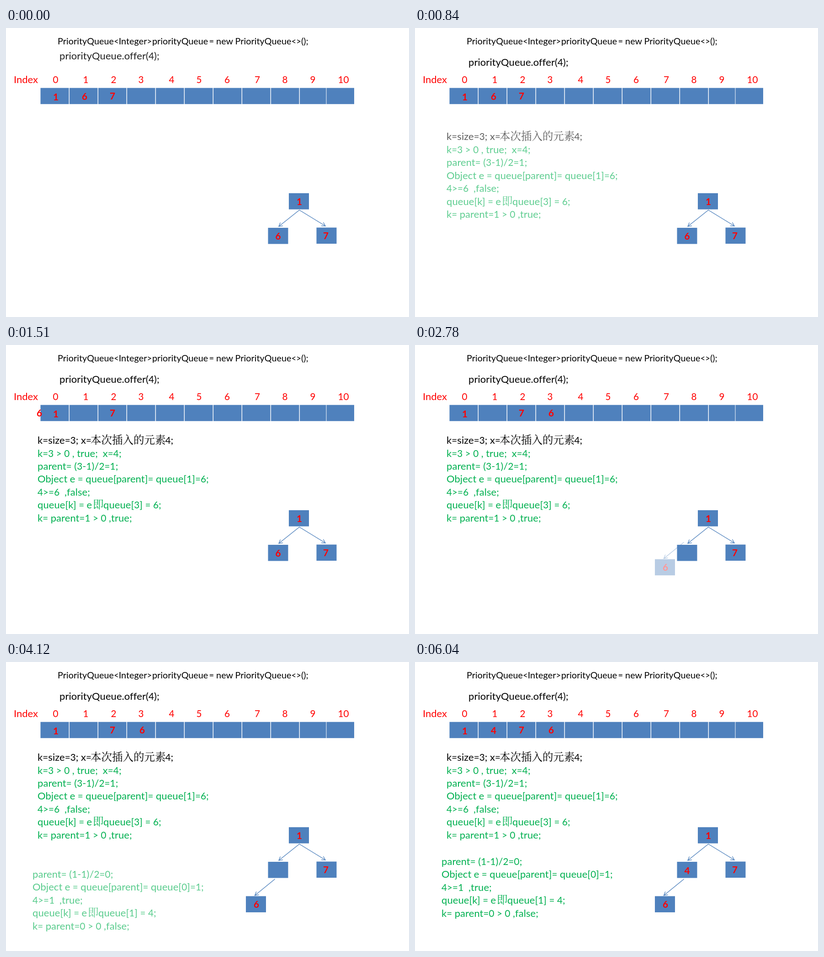
An HTML page that plays this animation: 882 px wide and 635 px high, repeating every 6.97 s.

```html
<!DOCTYPE html>
<html lang="zh">
<head>
<meta charset="utf-8">
<title>Heap insertion</title>
<style>
  html, body { margin: 0; width: 100%; height: 100%; overflow: hidden; background: #fff; }
  svg { display: block; }
  text {
    font: 22px Lato, sans-serif; letter-spacing: .06px; word-spacing: -.3px;
    white-space: pre; font-variant-ligatures: none;
  }
  .title { font-size: 19.7px; }
  .han { font: 300 23.5px "Noto Serif CJK SC", "Noto Sans CJK SC", "Noto Sans CJK", serif; letter-spacing: 0; }
  .symbol { font-size: .94em; }
  .label, .value { fill: #f00; text-anchor: middle; letter-spacing: 0; }
  .value { font-weight: bold; }
  .green { fill: #00b050; }
  rect { fill: #4f81bd; }
  .arrow, marker path { fill: none; stroke: #4a7ebb; stroke-width: 1.25; }
</style>
</head>
<body>
<svg id="stage" width="882" height="635" viewBox="0 0 882 635">
  <marker id="head" markerUnits="userSpaceOnUse" orient="auto" overflow="visible">
    <path d="M-8-4.5L0 0L-8 4.5"/>
  </marker>
</svg>
<script>
const stage = document.getElementById('stage');

function add(parent, tag, attrs = {}, content = '') {
  const el = document.createElementNS('http://www.w3.org/2000/svg', tag);
  for (const key in attrs) el.setAttribute(key, attrs[key]);
  el.textContent = content;
  return parent.appendChild(el);
}

// Digits and operators are set slightly smaller than letters.
function write(parent, x, y, cls, content) {
  const el = add(parent, 'text', { x, y, class: cls });
  String(content).split(/([\d=<>]+)/).forEach((part, i) => {
    if (part) add(el, 'tspan', i % 2 ? { class: 'symbol' } : {}, part);
  });
  return el;
}

const group = () => add(stage, 'g');
const value = (parent, x, y, digit) => write(parent, x, y + 7.5, 'value', digit);
const box = (parent, x, y, width = 44) => add(parent, 'rect', { x, y, width, height: 35.5 });
const arrow = (parent, d) => add(parent, 'path', { d, class: 'arrow', 'marker-end': 'url(#head)' });

// Each part is [x, text]; Chinese parts get their own font.
function line(parent, y, cls, ...parts) {
  for (const [x, text] of parts)
    write(parent, x, y, /[\u4e00-\u9fff]/.test(text) ? cls + ' han' : cls, text);
}

// Heading, index labels and array
line(stage, 36, 'title', [113, 'PriorityQueue<Integer>'], [320, 'priorityQueue'], [444.5, '= new'], [501.5, 'PriorityQueue<>();']);
const offer = group();
line(offer, 83, '', [117, 'priorityQueue.offer(4);']);
write(stage, 43.5, 121, 'label', 'Index');
[108.5, 174.5, 235.5, 295.5, 362.5, 422.5, 484, 550, 610.5, 671.5, 738.5]
  .forEach((x, i) => write(stage, x, 121, 'label', i));
box(stage, 75.5, 131.7, 686.5);
for (let i = 0; i < 10; i++)
  add(stage, 'path', { d: `M${i < 9 ? 138.3 + 63 * i : 701} 131V168`, stroke: '#fff', 'stroke-width': i < 9 ? 1.5 : 1 });
value(stage, 109, 151.5, 1);
value(stage, 233, 149, 7);
const cellSix = value(stage, 172, 150, 6);

// Tree
box(stage, 619, 363);
box(stage, 573.5, 439);
box(stage, 679.5, 438.5);
arrow(stage, 'M642 400L597 436');
arrow(stage, 'M642 400L699 435');
value(stage, 642, 381, 1);
value(stage, 700, 456, 7);
const treeSix = value(stage, 595.5, 457.5, 6);
const treeFour = group();
value(treeFour, 595.5, 458.5, 4);
const child = group();
arrow(child, 'M588.5 477L544.5 513');
box(child, 525, 514.5);
value(child, 548, 532, 6);

// Explanations
const first = group(), second = group();
line(first, 217, '', [69, 'k=size=3; x='], [185, '本次插入的元素'], [348.5, '4;']);
line(first, 245.5, 'green', [69, 'k=3 > 0 , true;  x=4;']);
function steps(parent, x, y, texts) {
  texts.forEach((text, i) => {
    const [left, right] = text.split('即');
    const parts = [[x, left]];
    if (right) parts.push([x + 121, '即'], [x + 144, right]);
    line(parent, y + 28.4 * i, 'green', ...parts);
  });
}
steps(first, 69, 274, ['parent= (3-1)/2=1;', 'Object e = queue[parent]= queue[1]=6;',
  '4>=6  ,false;', 'queue[k] = e即queue[3] = 6;', 'k= parent=1 > 0 ,true;']);
steps(second, 58, 446, ['parent= (1-1)/2=0;', 'Object e = queue[parent]= queue[0]=1;',
  '4>=1  ,true;', 'queue[k] = e即queue[1] = 4;', 'k= parent=0 > 0 ,false;']);

const flyingSix = value(stage, 0, 149, 6);
const flyingFour = value(stage, 172, 150, 4);

// Motion
const LOOP = 6970, FLOAT = 930;
const BEATS = [70, 770, 1510, 2220, 2950, 3660, 4360, 5070, 5800];
const progress = (t, start, length) => Math.min(1, Math.max(0, (t - start) / length));

// The picture advances in steps of about 80 ms.
function stepped(t) {
  const beat = BEATS.filter(b => b <= t).pop();
  return beat === undefined ? 0 : beat + 80 * Math.floor((t - beat + 10) / 80);
}

function floatIn(el, t, start, distance) {
  const p = progress(t, start, FLOAT);
  el.setAttribute('opacity', t < start ? 0 : Math.min(1, p + .09));
  el.setAttribute('transform', `translate(0 ${distance * (1 - p)})`);
}

function draw(t) {
  floatIn(offer, t, -725, -63.5);
  floatIn(first, t, 350, 63.5);
  floatIn(child, t, 2492, -63.5);
  floatIn(second, t, 3539, 63.5);
  floatIn(treeFour, t, 5065, 63.5);
  cellSix.setAttribute('opacity', t < 1300 ? 1 : 0);
  treeSix.setAttribute('opacity', 1 - progress(t, 1980, 490));
  flyingSix.setAttribute('x', -15 + 313 * progress(t, 1327, 650));
  flyingFour.setAttribute('y', -9.5 + 167 * progress(t, 4498, 552));
  flyingFour.setAttribute('opacity', t < 4498 ? 0 : 1);
}

const begin = performance.now();
function tick() {
  draw(stepped((performance.now() - begin) % LOOP));
  requestAnimationFrame(tick);
}
tick();
</script>
</body>
</html>
```
